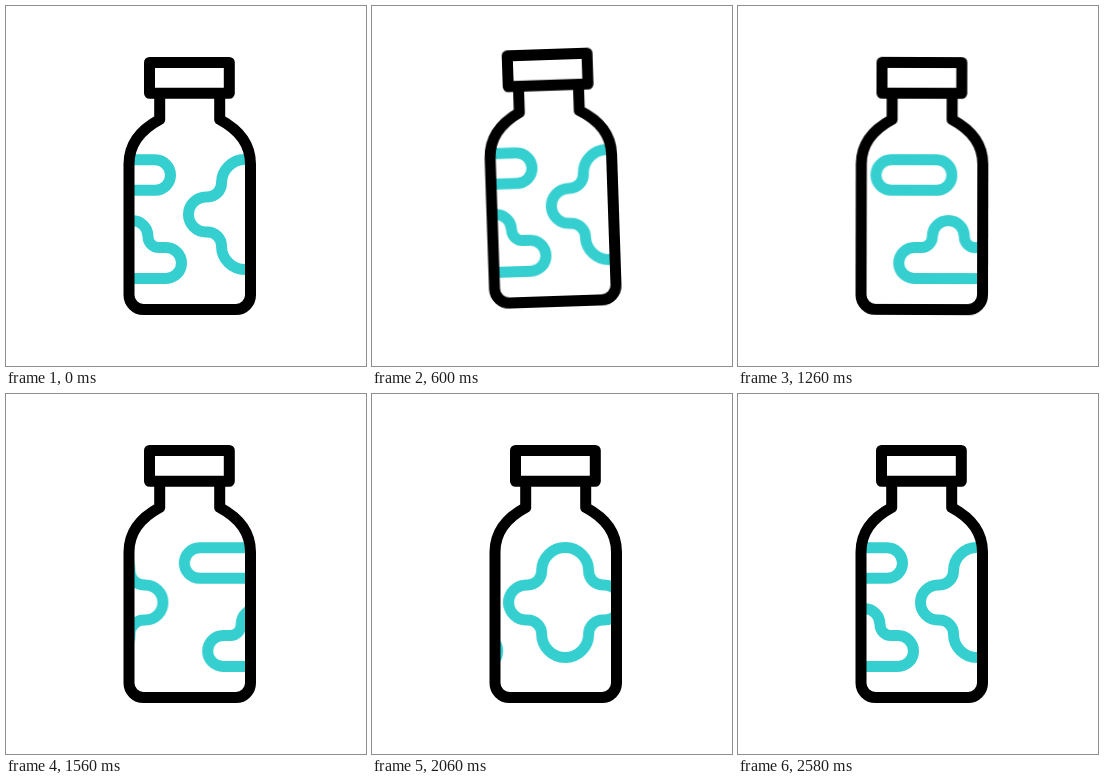
Recreate the animation shown at these times as an HTML page. Size 360 by 360 pixels, loop 3 s.

```html
<!DOCTYPE html>
<html lang="en">
<head>
<meta charset="utf-8">
<title>Bottle</title>
<style>
  html, body { margin: 0; width: 100%; height: 100%; overflow: hidden; background: #fff; }
  svg { display: block; width: 100%; height: 100%; }
  .ink, .label { fill: none; stroke-linecap: round; stroke-linejoin: round; stroke-width: 11; }
  .ink { stroke: #000; }
  .label { stroke: #35cfd0; }

  .lift, .rock, .pill, .cloud, .cross {
    animation: 3s cubic-bezier(.37, 0, .63, 1) infinite;
  }
  .lift { animation-name: lift; }
  .rock { animation-name: rock; transform-origin: 184px 303px; }
  .pill { animation-name: pill; }
  .cloud { animation-name: cloud; }
  .cross { animation-name: cross; }

  @keyframes lift {
    0%, 8.4% { transform: translateY(0); }
    24% { transform: translateY(-9.5px); }
    38%, 100% { transform: translateY(0); }
  }
  @keyframes rock {
    0%, 8.6% { transform: rotate(0deg); }
    13.333% { transform: rotate(-6deg); }
    27% { transform: rotate(2.4deg); }
    44.667%, 100% { transform: rotate(0deg); }
  }

  /* Each shape drifts one full turn around the bottle at its own pace. */
  @keyframes cross {
    0% { transform: translateX(0); }
    18.667% { transform: translateX(0); animation-timing-function: cubic-bezier(.333, 0, .667, .2); }
    32% { transform: translateX(18.5px); animation-timing-function: cubic-bezier(.333, .22, .667, .62); }
    42% { transform: translateX(68px); animation-timing-function: cubic-bezier(.333, .31, .667, .69); }
    60.667% { transform: translateX(182px); animation-timing-function: cubic-bezier(.333, .38, .667, .72); }
    68.667% { transform: translateX(222px); animation-timing-function: cubic-bezier(.333, .53, .667, 1); }
    86%, 100% { transform: translateX(268px); }
  }
  @keyframes pill {
    0% { transform: translateX(0); }
    21.333% { transform: translateX(0); animation-timing-function: cubic-bezier(.333, 0, .667, .14); }
    32% { transform: translateX(10px); animation-timing-function: cubic-bezier(.333, .205, .667, .65); }
    42% { transform: translateX(49px); animation-timing-function: cubic-bezier(.333, .33, .667, .65); }
    60.667% { transform: translateX(126px); animation-timing-function: cubic-bezier(.333, .36, .667, .7); }
    68.667% { transform: translateX(158px); animation-timing-function: cubic-bezier(.333, .47, .667, 1); }
    86%, 100% { transform: translateX(202px); }
  }
  @keyframes cloud {
    0% { transform: translateX(0); }
    21.333% { transform: translateX(0); animation-timing-function: cubic-bezier(.333, 0, .667, .23); }
    32% { transform: translateX(19px); animation-timing-function: cubic-bezier(.333, .215, .667, .74); }
    42% { transform: translateX(84px); animation-timing-function: cubic-bezier(.333, .44, .667, .64); }
    60.667% { transform: translateX(157px); animation-timing-function: cubic-bezier(.333, .32, .667, .67); }
    68.667% { transform: translateX(192px); animation-timing-function: cubic-bezier(.333, .48, .667, 1); }
    86%, 100% { transform: translateX(242px); }
  }
</style>
</head>
<body>
<svg viewBox="0 0 360 360">
  <defs>
    <path id="body" d="M153.7 90V113.5C136 123 123 137 123 158V289a14.5 14.5 0 0 0 14.5 14.5H230a14.5 14.5 0 0 0 14.5-14.5V158C244.5 137 231.5 123 213.7 113.5V90"/>
    <clipPath id="inside"><use href="#body"/></clipPath>
    <rect id="pill" x="88.5" y="153.8" width="76" height="30.5" rx="15.25"/>
    <path id="cloud" d="M92 272.5a15.5 15.5 0 0 1 0-31H99a11 11 0 0 0 11-11a16 16 0 0 1 32 0a11 11 0 0 0 11 11H160a15.5 15.5 0 0 1 0 31z"/>
    <path id="cross" d="M215.5 177a23.5 23.5 0 0 1 47 0a14 14 0 0 0 14 14h1.5a17.5 17.5 0 0 1 0 35h-1.5a14 14 0 0 0-14 14a23.5 23.5 0 0 1-47 0a14 14 0 0 0-14-14h-1.5a17.5 17.5 0 0 1 0-35h1.5a14 14 0 0 0 14-14z"/>
  </defs>
  <g class="lift">
    <g class="rock">
      <g class="label" clip-path="url(#inside)">
        <g class="pill"><use href="#pill"/><use href="#pill" x="-202"/></g>
        <g class="cloud"><use href="#cloud"/><use href="#cloud" x="-242"/></g>
        <g class="cross"><use href="#cross"/><use href="#cross" x="-268"/></g>
      </g>
      <g class="ink">
        <use href="#body"/>
        <rect x="143.5" y="56.5" width="79.8" height="30.8"/>
      </g>
    </g>
  </g>
</svg>
</body>
</html>
```
